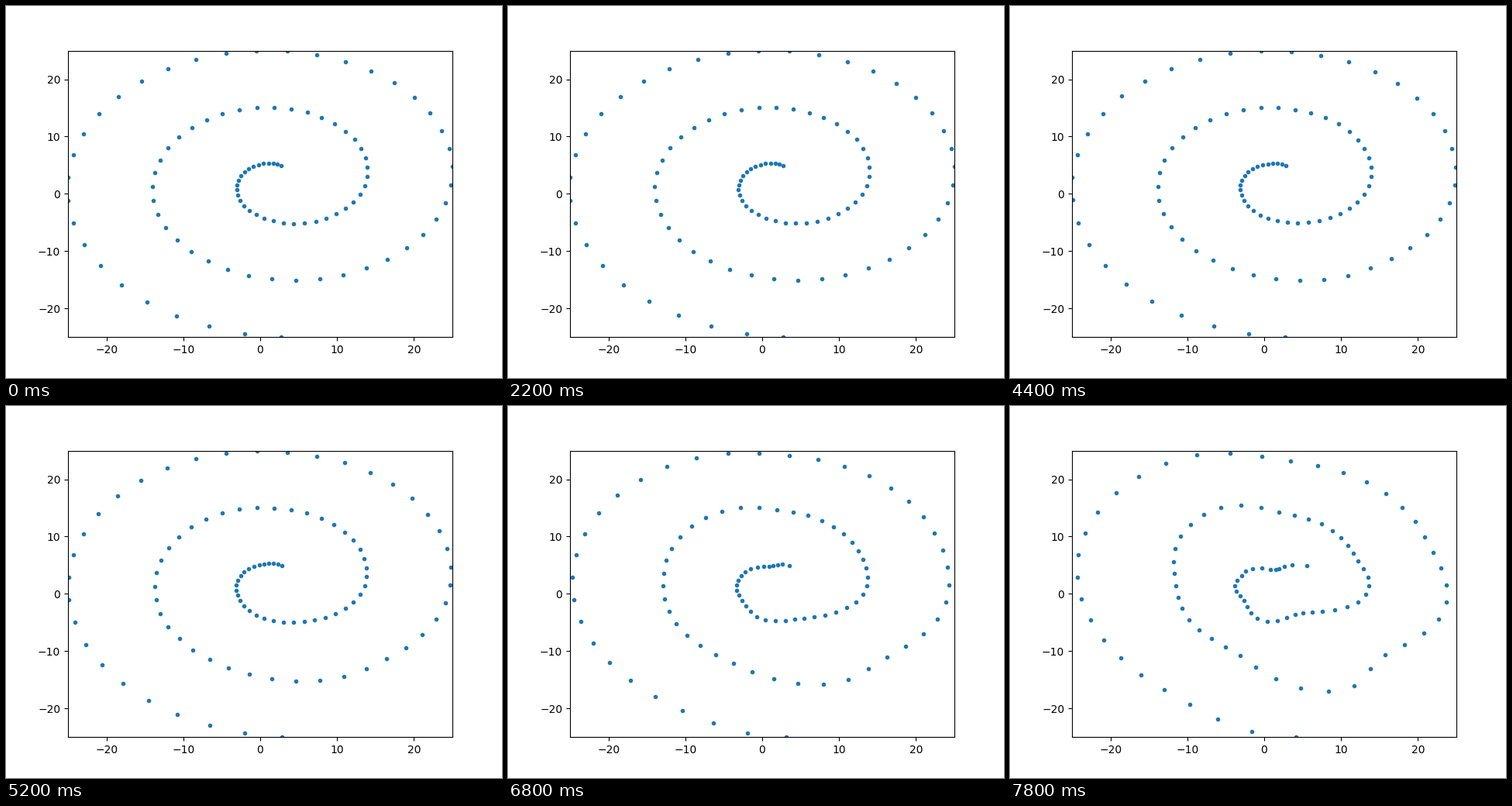
These frames come from a looping animation (640 by 480 pixels, 8 s). A matplotlib script:

```python
import numpy as np
import matplotlib.pyplot as plt
from matplotlib.animation import FuncAnimation

COUNT, LIMIT = 100, 25
FRAMES, STEP_MS = 40, 200
DECAY = 0.44  # share of the final warp present one second earlier

# Key points along the spiral: (dot, final change of radius as a fraction)
WARP = [
    (0, 0), (4, -.38), (8, .07), (11, .13), (14, 0), (17, .11), (22, -.24),
    (28, .02), (33, -.15), (39, -.09), (43, .1), (51, -.16), (56, -.18),
    (61.5, .13), (64, -.06), (67, -.01), (72, -.13), (78, -.09), (83, .05),
    (95, -.1), (99, 0)]


def fit(values):
    """Scale values to the axis range; return the centre and the offsets."""
    low, high = values.min(), values.max()
    scale = 2 * LIMIT / (high - low)
    return -LIMIT - low * scale, values * scale


def ease_between(keys, at):
    """Interpolate keys with a cosine ease from each one to the next."""
    where, value = zip(*keys)
    order = np.arange(len(keys))
    place = np.interp(at, where, order)
    whole = np.floor(place)
    eased = whole + (1 - np.cos(np.pi * (place - whole))) / 2
    return np.interp(eased, order, value)


index = np.arange(COUNT)
theta = np.linspace(np.pi / 2, 11 * np.pi / 2, COUNT)
center_x, arm_x = fit(theta * np.cos(theta))
center_y, arm_y = fit(theta * np.sin(theta))

warp = ease_between(WARP, index)
# Both loose ends slide to the right
slide = 2.8 * 0.5 ** index + 1.4 * 0.25 ** index[::-1]

fig, ax = plt.subplots(figsize=(6.4, 4.8), dpi=100)
ax.set_xlim(-LIMIT, LIMIT)
ax.set_ylim(-LIMIT, LIMIT)
dots, = ax.plot([], [], ".", color="#1f77b4")


def draw(frame):
    seconds_left = (FRAMES - 1 - frame) * STEP_MS / 1000
    grown = DECAY ** seconds_left
    radius = 1 + warp * grown
    dots.set_data(center_x + arm_x * radius + slide * grown ** 1.5,
                  center_y + arm_y * radius)
    return dots,


anim = FuncAnimation(fig, draw, frames=FRAMES, interval=STEP_MS,
                     repeat=True, repeat_delay=0)
plt.show()
```
